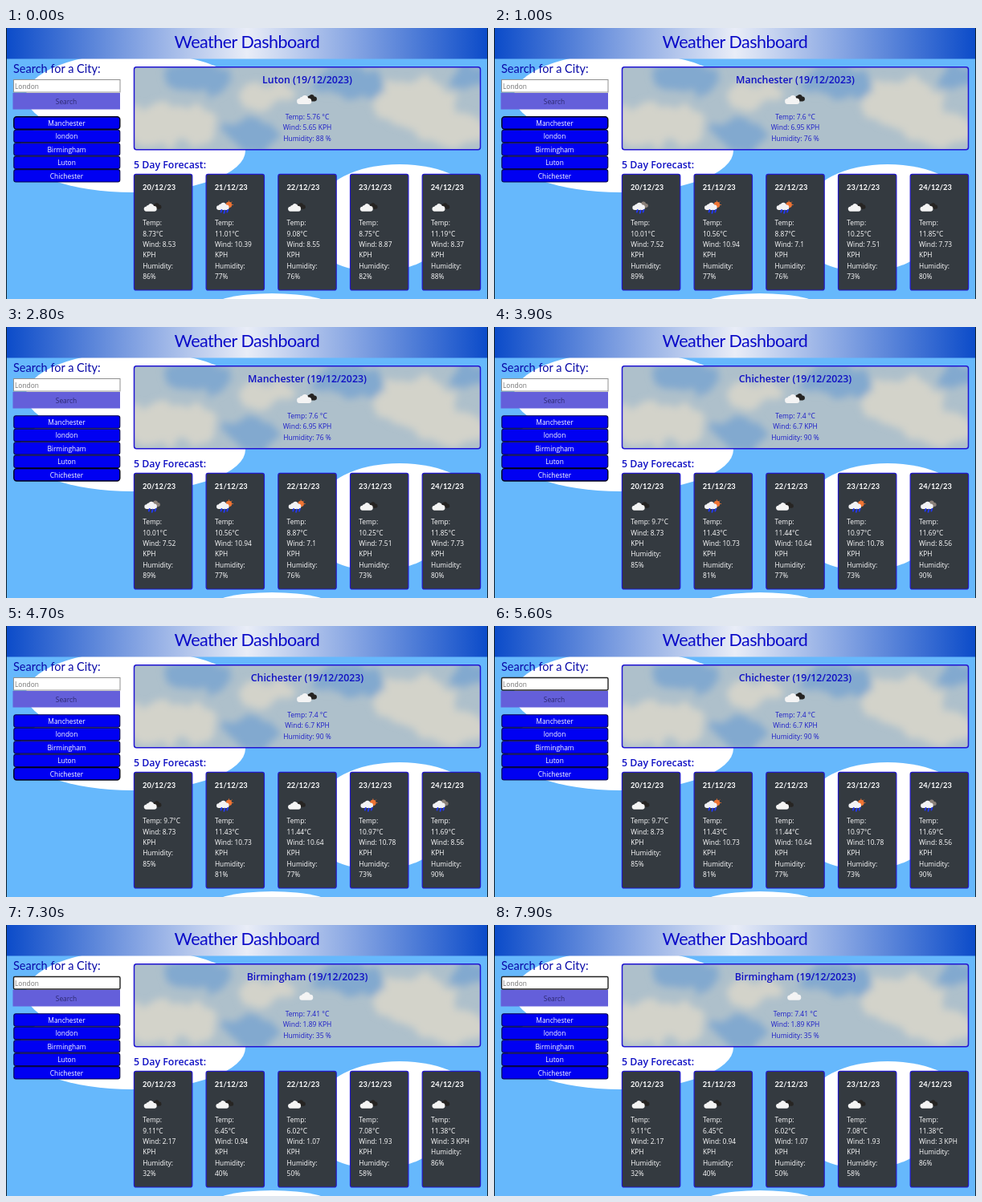
An HTML page that plays this animation: 600 by 338 pixels, repeating every 8 s.

```html
<!DOCTYPE html>
<html lang="en">
<head>
<meta charset="utf-8">
<title>Weather Dashboard</title>
<style>
  html, body { margin: 0; width: 100%; height: 100%; overflow: hidden; background: #66b8fc; }
  svg { display: block; width: 100vw; height: 100vh; }
  text { font-family: "Open Sans", "Noto Sans", sans-serif; font-size: 8.4px; }
  .gill { font-family: Lato, sans-serif; }
  .title { font-size: 21.5px; letter-spacing: -.5px; fill: #0a0ac8; }
  .label { font-size: 14.5px; fill: #0a0aa8; }
  .heading { font-size: 12.35px; font-weight: 600; fill: #1010c4; }
  .now { font-size: 8.5px; fill: #1c1cc8; }
  .date { font-size: 9.3px; font-weight: 700; }
  .light { fill: #fff; }
  .mid { text-anchor: middle; }
</style>
</head>
<body>
<svg viewBox="0 0 600 338" preserveAspectRatio="none">
  <defs>
    <linearGradient id="bar" x1="0" y1="0" x2="1" y2="0">
      <stop offset="0" stop-color="#0b4bc9"/>
      <stop offset=".5" stop-color="#e9edf7"/>
      <stop offset="1" stop-color="#0b4bc9"/>
    </linearGradient>
    <filter id="soft" x="-20%" y="-40%" width="140%" height="180%">
      <feTurbulence type="fractalNoise" baseFrequency=".045" numOctaves="4" seed="7" result="noise"/>
      <feDisplacementMap in="SourceGraphic" in2="noise" scale="30" xChannelSelector="R" yChannelSelector="G"/>
      <feGaussianBlur stdDeviation="5"/>
    </filter>
    <clipPath id="panel"><rect x="159" y="48" width="432" height="104" rx="3"/></clipPath>
    <path id="puff" d="M-8 6a4 4 0 0 1-.5-8a3.6 3.6 0 0 1 3.5-2.4a5.2 5.2 0 0 1 9.4 1.6a4.4 4.4 0 0 1 .6 8.8z"/>
    <path id="drops" d="M-5 4l-1 3M-.5 5l-1 3.5M4 4l-1 3" stroke="#2438ee" stroke-width="2.3" stroke-linecap="round"/>
    <g id="cloud"><use href="#puff" fill="#f4f4f4"/></g>
    <g id="broken">
      <use href="#puff" fill="#262422" transform="translate(6 -1.6) scale(.68)"/>
      <use href="#puff" fill="#f4f4f4" transform="translate(-2.5 .8) scale(.87)"/>
    </g>
    <g id="sunRain">
      <circle cx="5.5" cy="-3.5" r="4.4" fill="#ee7434"/>
      <path d="M5.5-9.5v2M12-3.5h-2M10-8l-1.4 1.4" stroke="#ee7434"/>
      <use href="#puff" fill="#f2f2f4" transform="translate(-2 -1) scale(.85)"/>
      <use href="#drops"/>
    </g>
    <g id="rain">
      <use href="#puff" fill="#8b8179" transform="translate(4 -3.4) scale(.7)"/>
      <use href="#puff" fill="#f2f2f4" transform="translate(-2 -1) scale(.85)"/>
      <use href="#drops"/>
    </g>
  </defs>

  <rect width="600" height="338" fill="#66b8fc"/>
  <g fill="#fff">
    <ellipse cx="162" cy="85" rx="137" ry="54"/>
    <ellipse cx="157" cy="153" rx="141" ry="52"/>
    <ellipse cx="490" cy="220" rx="98" ry="50"/>
    <ellipse cx="462" cy="262" rx="78" ry="42"/>
    <ellipse cx="331" cy="351" rx="80" ry="20"/>
  </g>
  <rect width="600" height="38.5" fill="url(#bar)"/>
  <path d="M.5 0v338M599.5 0v338" stroke="#10202e"/>
  <text class="gill title mid" x="300" y="25">Weather Dashboard</text>

  <text class="gill label" x="9" y="56">Search for a City:</text>
  <rect id="field" x="9.5" y="64.5" width="132.5" height="15.5" fill="#fff"/>
  <text x="11" y="75.5" fill="#757575">London</text>
  <rect x="8.5" y="81" width="133.5" height="20.5" fill="#645fda"/>
  <text class="mid" x="75" y="94.5" fill="#2c2870">Search</text>
  <g id="cities"></g>

  <g clip-path="url(#panel)">
    <rect x="159" y="48" width="432" height="104" fill="#aec0cb"/>
    <g filter="url(#soft)">
      <g fill="#82a9cf">
        <ellipse cx="240" cy="62" rx="42" ry="20"/>
        <ellipse cx="310" cy="134" rx="36" ry="20"/>
        <ellipse cx="425" cy="68" rx="44" ry="20"/>
        <ellipse cx="578" cy="62" rx="26" ry="18"/>
      </g>
      <g fill="#d3d3ca">
        <ellipse cx="205" cy="120" rx="62" ry="28"/>
        <ellipse cx="325" cy="82" rx="34" ry="16"/>
        <ellipse cx="510" cy="96" rx="52" ry="32"/>
        <ellipse cx="555" cy="126" rx="48" ry="24"/>
      </g>
    </g>
  </g>
  <rect x="159.5" y="48.8" width="431" height="103" rx="3" fill="none" stroke="#2014d2" stroke-width="1.5"/>
  <g id="today"></g>
  <text class="heading" x="159" y="174.5">5 Day Forecast:</text>
  <g id="days"></g>
</svg>
<script>
const LOOP = 8000;
const CITIES = ["Manchester", "london", "Birmingham", "Luton", "Chichester"];

// now: temperature, wind, humidity, icon; days: the same per day
const REPORTS = {
  Luton: {
    now: "5.76 5.65 88 broken",
    days: ["8.73 8.53 86 broken", "11.01 10.39 77 sunRain", "9.08 8.55 76 broken",
           "8.75 8.87 82 broken", "11.19 8.37 88 broken"]
  },
  Manchester: {
    now: "7.6 6.95 76 broken",
    days: ["10.01 7.52 89 rain", "10.56 10.94 77 sunRain", "8.87 7.1 76 sunRain",
           "10.25 7.51 73 broken", "11.85 7.73 80 broken"]
  },
  Chichester: {
    now: "7.4 6.7 90 broken",
    days: ["9.7 8.73 85 broken", "11.43 10.73 81 sunRain", "11.44 10.64 77 broken",
           "10.97 10.78 73 sunRain", "11.69 8.56 90 rain"]
  },
  Birmingham: {
    now: "7.41 1.89 35 cloud",
    days: ["9.11 2.17 32 broken", "6.45 0.94 40 broken", "6.02 1.07 50 broken",
           "7.08 1.93 58 broken", "11.38 3 86 broken"]
  }
};

// start time, city shown, focused control
const STEPS = [
  [0, "Luton", "Manchester"],
  [600, "Manchester", "Manchester"],
  [2400, "Manchester", "Chichester"],
  [3300, "Chichester", "Chichester"],
  [5100, "Chichester", "field"],
  [6000, "Birmingham", "field"]
];

const byId = id => document.getElementById(id);
const label = (x, y, cls, value) => `<text x="${x}" y="${y}" class="${cls}">${value}</text>`;
const icon = (name, x, y, scale) =>
  `<use href="#${name}" transform="translate(${x} ${y}) scale(${scale})"/>`;

function drawCities(focus) {
  byId("cities").innerHTML = CITIES.map((city, i) => {
    const y = 110.8 + i * 16.45;
    const ring = city === focus ? 'stroke="#000018" stroke-width="1.4" rx="3.5"'
                                : 'stroke="#060648" stroke-width="1.1" rx="2.5"';
    return `<rect x="9.8" y="${y}" width="132" height="15.4" fill="#0000f2" ${ring}/>` +
           label(75.5, y + 11, "light mid", city);
  }).join("");
  const active = focus === "field";
  const field = byId("field");
  field.setAttribute("stroke", active ? "#202020" : "#909090");
  field.setAttribute("stroke-width", active ? 1.4 : 1);
  field.setAttribute("rx", active ? 1.5 : 0);
}

function drawToday(city) {
  const [temp, wind, humidity, sky] = REPORTS[city].now.split(" ");
  byId("today").innerHTML =
    label(375, 69, "heading mid", `${city} (19/12/2023)`) +
    icon(sky, 375, 89, sky === "cloud" ? .8 : .98) +
    label(375, 114, "now mid", `Temp: ${temp} °C`) +
    label(375, 127.4, "now mid", `Wind: ${wind} KPH`) +
    label(375, 140.7, "now mid", `Humidity: ${humidity} %`);
}

function dayLines(temp, wind, humidity) {
  return [
    ...(temp.length < 4 ? [`Temp: ${temp}°C`] : ["Temp:", `${temp}°C`]),
    ...(wind.length < 2 ? [`Wind: ${wind} KPH`] : [`Wind: ${wind}`, "KPH"]),
    "Humidity:", `${humidity}%`
  ];
}

function drawDays(city) {
  byId("days").innerHTML = REPORTS[city].days.map((day, i) => {
    const [temp, wind, humidity, sky] = day.split(" ");
    const x = 159 + i * 89.7;
    return `<rect x="${x + .4}" y="182.4" width="72.4" height="144.6" rx="2.5"
              fill="#343a40" stroke="#2218c8" stroke-width="1.2"/>` +
      label(x + 11, 201.6, "gill date light", `${20 + i}/12/23`) +
      icon(sky, x + 24, 223.5, .86) +
      dayLines(temp, wind, humidity)
        .map((line, n) => label(x + 11.2, 246.4 + n * 13.3, "light", line)).join("");
  }).join("");
}

let shown;
function frame() {
  const time = performance.now() % LOOP;
  const step = STEPS.findLast(([start]) => start <= time);
  if (step !== shown) {
    const [, city, focus] = shown = step;
    drawCities(focus);
    drawToday(city);
    drawDays(city);
  }
  requestAnimationFrame(frame);
}
frame();
</script>
</body>
</html>
```
